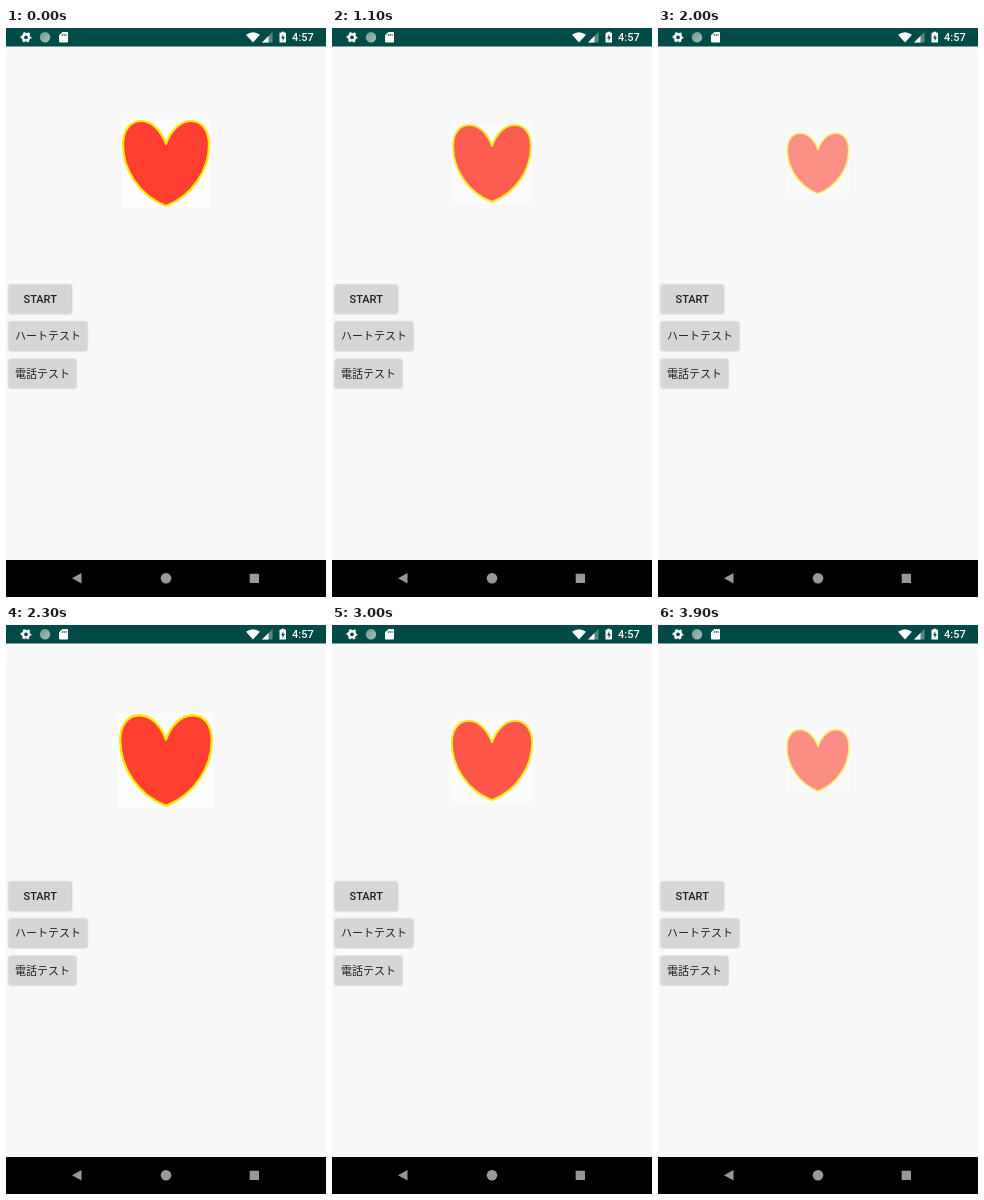
Write an HTML page that moves like this. It is 320x569 px and loops after 4000 ms.

```html
<!DOCTYPE html>
<html lang="ja">
<head>
<meta charset="utf-8">
<title>Heart</title>
<style>
  html, body { margin: 0; width: 100%; height: 100%; overflow: hidden; background: #f8f8f8; }
  svg { display: block; width: 100%; height: 100%; }
  text { font: 500 11px Roboto, sans-serif; }
  .ja { font: 400 11px "Noto Sans CJK JP", "Noto Sans CJK", sans-serif; }
  .btn rect { fill: #d6d6d6; }
  .btn { filter: drop-shadow(0 .8px .8px rgba(0, 0, 0, .3)); }
  .btn.down { filter: drop-shadow(0 1.6px 1.4px rgba(0, 0, 0, .32)); }
  .btn.down rect { fill: #cacaca; }
  .btn text { fill: #202020; }
</style>
</head>
<body>
<svg viewBox="0 0 320 569">
  <defs>
    <linearGradient id="ball" x1="0" y1="0" x2="1" y2="1">
      <stop offset="0" stop-color="#6f9a95"/>
      <stop offset="1" stop-color="#a9bfbc"/>
    </linearGradient>
  </defs>
  <rect width="320" height="569" fill="#f8f8f8"/>

  <!-- status bar -->
  <rect width="320" height="18.5" fill="#004b47"/>
  <g fill="#fff">
    <circle cx="20" cy="9.3" r="3.1" fill="none" stroke="#fff" stroke-width="2.4"/>
    <circle cx="20" cy="9.3" r="4.6" fill="none" stroke="#fff" stroke-width="1.6" stroke-dasharray="2.4 2.417" stroke-dashoffset="1.2"/>
    <circle cx="39" cy="9.3" r="5.2" fill="url(#ball)"/>
    <path d="M56.5 4H61a1 1 0 0 1 1 1v8.5a1 1 0 0 1-1 1h-7a1 1 0 0 1-1-1V7.300z"/>
    <path d="M56.300 6v2M58.200 6v2M60.100 6v2" stroke="#004b47" stroke-width=".8"/>
    <path d="M240 6.700Q247 1.700 254 6.700L247 14.500z"/>
    <path d="M256 14.500L266.500 4V14.500z" opacity=".35"/>
    <path d="M256 14.500L262.500 8V14.500z"/>
    <path d="M275.300 3.800h3v1h1.700v9.700h-6.500V4.800h1.800z"/>
    <path d="M277.300 6.300l-2.200 4h1.500v2.900l2.200-4.100h-1.500z" fill="#004b47"/>
    <text x="286" y="13.300">4:57</text>
  </g>

  <!-- heart -->
  <g id="heart">
    <rect x="-44.500" y="-44.500" width="89" height="89" fill="#fdfdfd"/>
    <path d="M0 -19.500C-5 -34 -15 -42.500 -25 -42.500C-36 -42.500 -43 -33 -43 -19C-43 6 -27 32 0 42.500C27 32 43 6 43 -19C43 -33 36 -42.500 25 -42.500C15 -42.500 5 -34 0 -19.500Z"
      fill="#ff4030" stroke="#f8e808" stroke-width="2.200" stroke-linejoin="round"/>
  </g>

  <!-- buttons -->
  <g class="btn" id="start">
    <rect x="3" y="257" width="62.500" height="28.500" rx="1.500"/>
    <text x="34.200" y="275" text-anchor="middle">START</text>
  </g>
  <g class="btn">
    <rect x="3" y="294" width="78" height="28.500" rx="1.500"/>
    <text class="ja" x="9" y="312.300">ハートテスト</text>
  </g>
  <g class="btn">
    <rect x="3" y="331.500" width="67" height="28.500" rx="1.500"/>
    <text class="ja" x="9" y="349.800">電話テスト</text>
  </g>

  <!-- navigation bar -->
  <rect y="532" width="320" height="37"/>
  <g fill="#999">
    <path d="M66 550.300L75.500 545V555.600z"/>
    <circle cx="160" cy="550.300" r="5.300"/>
    <rect x="243.700" y="545.700" width="9.300" height="9.300" rx=".5"/>
  </g>
</svg>
<script>
  const LOOP = 4000, STEP = 100, BEAT = 2000, BEGIN = 200, LEAD = 40;
  const heart = document.getElementById('heart');
  const start = document.getElementById('start');
  const ease = p => (1 - Math.cos(Math.PI * p)) / 2;

  function draw(ms) {
    const t = Math.floor((ms % LOOP) / STEP) * STEP;
    let scale = 1, alpha = 1;
    if (t >= BEGIN) {
      const e = ease(((t - BEGIN + LEAD) % BEAT) / BEAT);
      scale = 1.07 - 0.362 * e;
      alpha = 1 - 0.45 * e ** 1.3;
    }
    heart.setAttribute('transform', `translate(160 135.5) scale(${scale})`);
    heart.setAttribute('opacity', alpha);
    start.classList.toggle('down', t >= 100 && t < 400);
  }

  const origin = performance.now();
  function tick() {
    draw(performance.now() - origin);
    requestAnimationFrame(tick);
  }
  tick();
</script>
</body>
</html>
```
